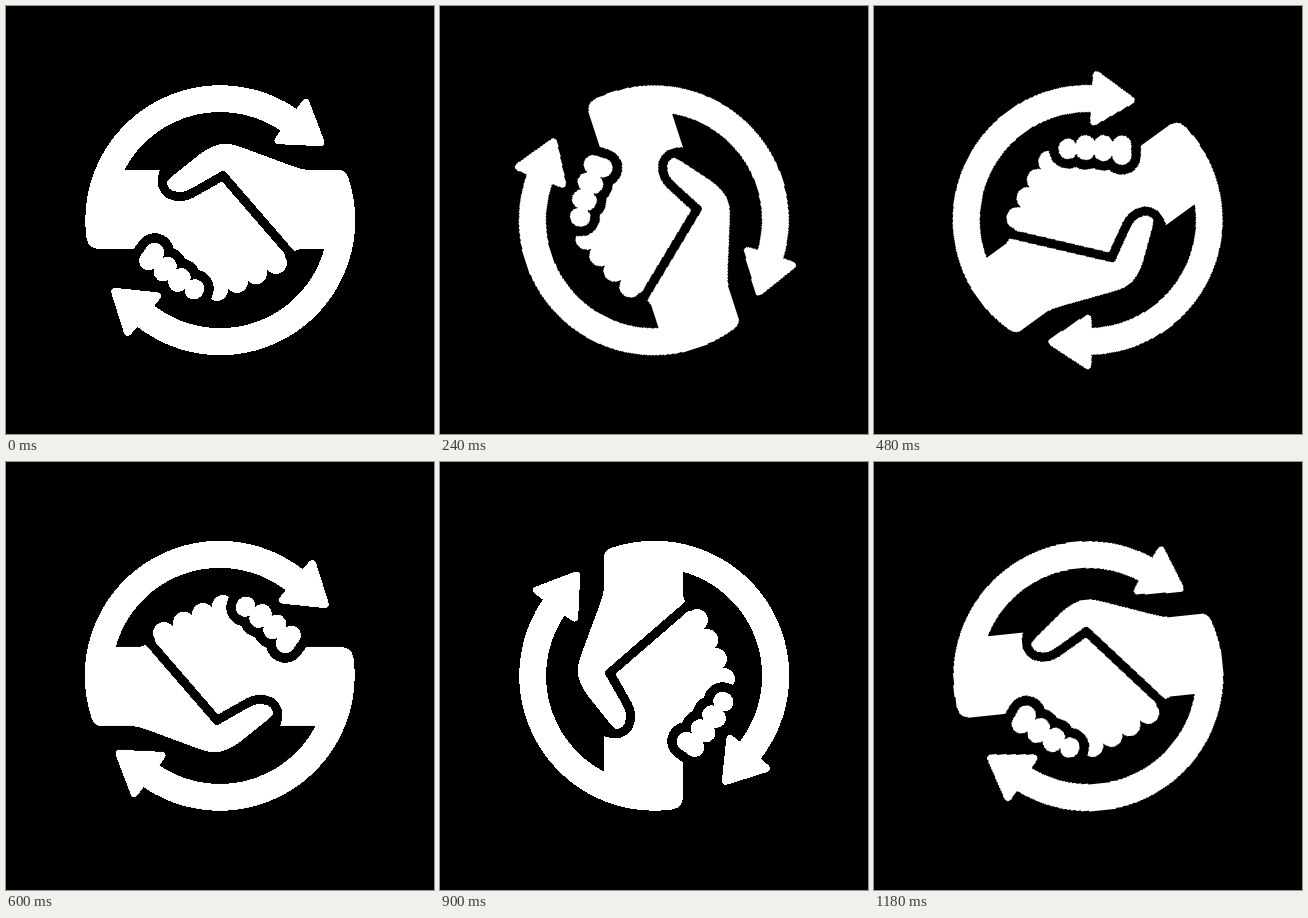
An HTML page that plays this animation: 428 px wide and 428 px high, repeating every 1200 ms.

```html
<!DOCTYPE html>
<html lang="en">
<head>
<meta charset="utf-8">
<title>Handshake cycle</title>
<style>
  html, body { margin: 0; width: 100%; height: 100%; overflow: hidden; background: #000; }
  svg { display: block; width: 100%; height: 100%; shape-rendering: crispEdges; }
  #spin { transform-origin: 214px 214px; }
  .line { fill: none; stroke-linecap: round; stroke-linejoin: round; }
</style>
</head>
<body>
<svg viewBox="0 0 428 428">
  <defs>
    <path id="head" d="M69 213.5H115L92 178.5Z" stroke="#fff" stroke-width="8" stroke-linejoin="round"/>
    <path id="fingers" class="line" d="M284.4 194h1.5M283.4 211.5h6M282.4 229.5h7M278.4 247.8h10.5"/>
  </defs>
  <g id="spin" fill="#fff">
    <!-- left arm, upper arc and palm -->
    <path d="M92 242.8Q83 242.8 80.6 233A135 135 0 0 1 295.2 106.2L279 127.7
      A108 108 0 0 0 118.5 163.8H154L160 188L180 191L217.5 169L279 245V252L271 260L212 287L131 242.8Z"/>
    <g id="knuckles"></g>
    <!-- right arm, lower arc and thumb -->
    <path d="M302 163.8H331Q340 163.8 342.5 172A135 135 0 0 1 127.2 317.4L144.6 296.7
      A108 108 0 0 0 318.3 242.8H295L288 245L217.5 168L186 187Q172 192 164 188Q157 178 164 172
      L193 148.8C207 138 218 135 234 140.7L280 157.7C290 161.5 296 163.8 302 163.8Z"/>
    <path class="line" stroke="#000" stroke-width="9"
      d="M158.3 165C155.5 172 156 179 158 182.5C162 190.5 175 193.2 186 187.3L217 169.7L285.3 248.6"/>
    <g transform="rotate(126 214 214)">
      <use href="#fingers" stroke="#000" stroke-width="38"/>
      <use href="#fingers" stroke="#fff" stroke-width="19"/>
      <use href="#head"/>
    </g>
    <use href="#head" transform="rotate(309.3 214 214)"/>
  </g>
</svg>
<script>
  const LOOP = 1200, STEPS = 60;
  const $ = id => document.getElementById(id);

  $('knuckles').innerHTML = [[270, 257], [250, 267.3], [231, 276], [211, 284]]
    .map(([x, y]) => `<circle cx="${x}" cy="${y}" r="11"/>`).join('');

  // The 1 ms lead keeps rounding away from the step edges.
  $('spin').animate(
    [{ transform: 'rotate(0deg)' }, { transform: 'rotate(360deg)' }],
    { duration: LOOP, delay: -1, iterations: Infinity, easing: `steps(${STEPS}, end)` }
  );
</script>
</body>
</html>
```
